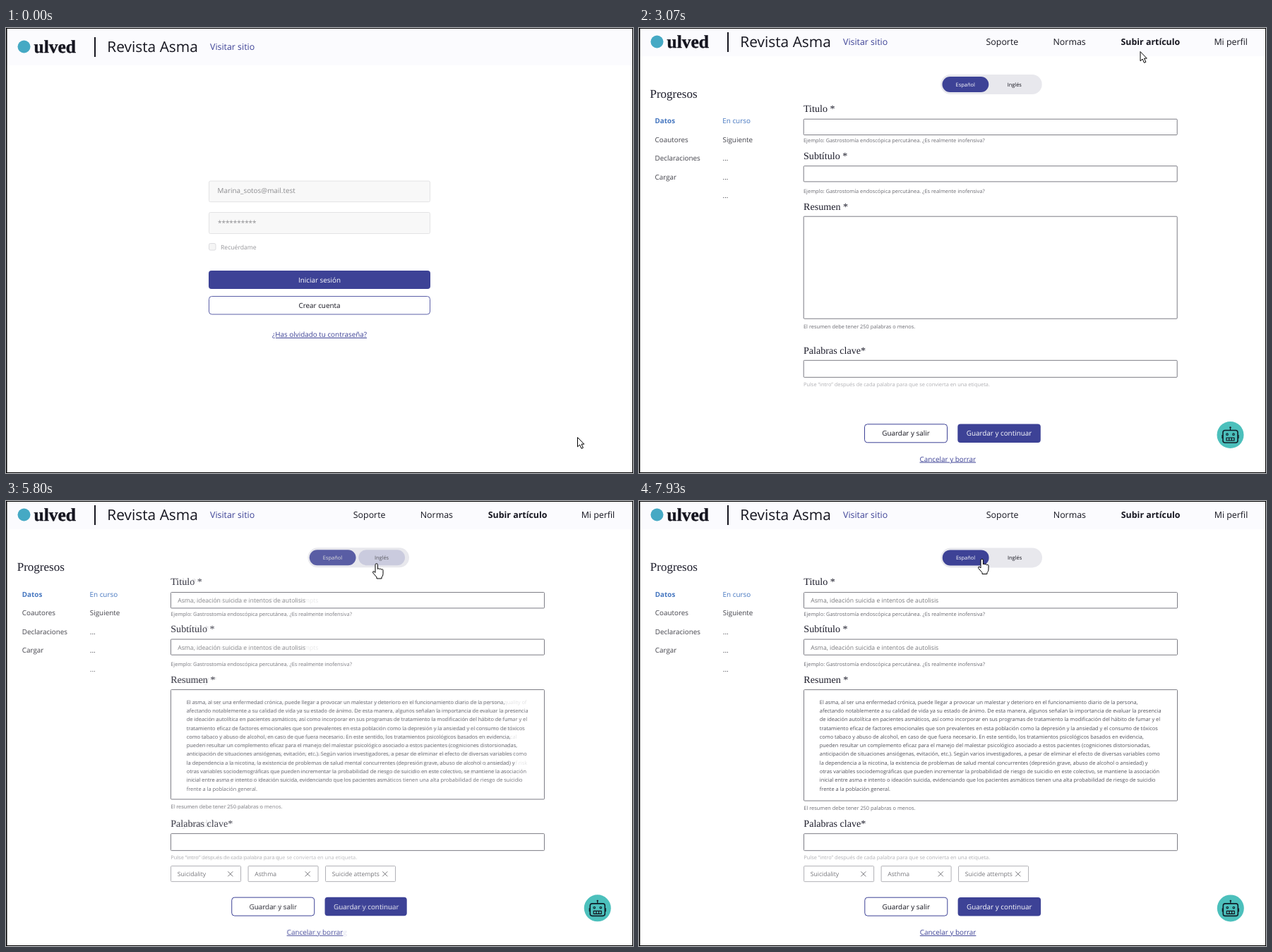
An HTML page for the animation above (8 s loop, 888 by 631 pixels).

```html
<!DOCTYPE html>
<html lang="es">
<head>
<meta charset="utf-8">
<style>
  html, body { margin: 0; width: 100%; height: 100%; overflow: hidden; background: #fff; }
  svg { display: block; width: 888px; height: 631px; text-rendering: geometricPrecision; font-family: "Open Sans", sans-serif; fill: #15151f; }
  .serif { font-family: "Liberation Serif", serif; }
  .bold { font-weight: 700; }
  .mid { text-anchor: middle; }
  .link { text-decoration: underline; }
</style>
</head>
<body>
<svg id="stage" viewBox="0 0 888 631"></svg>
<script>
const BLUE = '#3d4296', SKY = '#4677c0', INK = '#15151f', SOFT = '#6b6b72', WHITE = '#fff';

const text = (x, y, str, size = 9.9, color = INK, cls = '') =>
  `<text x="${x}" y="${y}" font-size="${size}" fill="${color}" class="${cls}">${str}</text>`;
const rect = (x, y, w, h, fill = 'none', stroke = 'none', r = 0, extra = '') =>
  `<rect x="${x}" y="${y}" width="${w}" height="${h}" rx="${r}" fill="${fill}" stroke="${stroke}" ${extra}/>`;
const path = (d, width = 1, color = INK, fill = 'none', extra = '') =>
  `<path d="${d}" fill="${fill}" stroke="${color}" stroke-width="${width}" stroke-linejoin="round" ${extra}/>`;
const group = (id, content, extra = '') => `<g id="${id}" ${extra}>${content}</g>`;
const serif = (x, y, str, size = 14.1, cls = '') => text(x, y, str, size, '#1d1d2b', 'serif ' + cls);

const nav = (y, items) => items.map(([x, str, cls]) => text(x, y, str, 12.4, INK, cls)).join('');

const robot = (x, y) => `<g transform="translate(${x} ${y})">
  <circle r="19" fill="#4cc0bc"/>
  ${rect(-10.5, -6.5, 21, 17.5, 'none', '#10202a', 3, 'stroke-width="1.6"')}
  ${path('M0-6.5V-9.5M-11.5 0V5M11.5 0V5M-5.5 4H5.5V8H-5.5ZM-1.8 4V8M1.8 4V8', 1.2)}
  <circle cy="-10.5" r="1.2"/>
  <circle cx="-4.5" cy="-.8" r="1.3" fill="none" stroke="#10202a" stroke-width="1.1"/>
  <circle cx="4.5" cy="-.8" r="1.3" fill="none" stroke="#10202a" stroke-width="1.1"/></g>`;

const login = [
  rect(287.5, 217, 313, 29.5, '#f8f8f8', '#e3e3e5', 2),
  rect(287.5, 261.5, 313, 30, '#f8f8f8', '#e3e3e5', 2),
  text(299.5, 234, 'Marina_sotos@mail.test', 9.9, '#8c8c8f'),
  text(300, 279.5, '**********', 9.9, '#8c8c8f'),
  rect(287.5, 305.5, 9.5, 9.5, '#f5f5f5', '#dcdcdf', 2),
  text(304, 313.5, 'Recuérdame', 8.65, '#96969a'),
  rect(287, 344, 314, 26, BLUE, 'none', 4),
  text(444, 360.5, 'Iniciar sesión', 9.9, WHITE, 'mid'),
  rect(287.5, 380.5, 313, 25.5, WHITE, '#5c60a8', 4),
  text(444, 397, 'Crear cuenta', 9.9, INK, 'mid'),
  text(444, 438, '¿Has olvidado tu contraseña?', 9.9, BLUE, 'mid link')
].join('');

const card = (x, w, label, labelWidth, color, dotsX) => [
  rect(x + .5, 295.5, w, 138, '#fbfbfe', '#74747f', 4),
  rect(x + 19, 317, labelWidth, 15, color, 'none', 2),
  text(x + 19 + labelWidth / 2, 327.3, label, 7.4, WHITE, 'mid'),
  ...[319.5, 324, 328.5].map(y => `<circle cx="${dotsX}" cy="${y}" r="1.4"/>`),
  text(x + 18.5, 353.5, 'RCNP-2024-15-R1', 9.9, BLUE, 'bold'),
  text(x + 19, 378, 'Marina Sotos', 8.65, '#55555c'),
  serif(x + 19, 398, 'Asma, ideación suicida e intentos', 12.1),
  serif(x + 19, 412.5, 'de autolisis', 12.1)
].join('');

const counter = (numX, x, count, label) =>
  serif(numX, 219, count, 26.5) + text(x, 240, label, 9.9, SOFT);

const dash = [
  nav(31.3, [[494, 'Soporte'], [589, 'Normas'], [684.5, 'Subir artículo'], [810.5, 'Mi perfil', 'bold']]),
  path('M430 122V94Q430 92.5 431.5 92.5H451L457.5 99V103M457.5 114V122M451 93V99H457M435 101H446M435 107H450M435 113H446', 2),
  path('M447 119L448.5 113.5 459.5 101.5Q461.5 100.5 463.5 103.5L452 116.5Z', 2),
  rect(231, 121, 426.5, 60.5, '#e7e7ea', 'none', 4),
  serif(444, 160, 'Hola, Marina Sotos Peñalbar', 14.1, 'mid'),
  counter(232, 230.5, 3, 'enviados'), counter(321.5, 322.5, 1, 'con cambios'),
  counter(413.5, 414, 1, 'revisión'), counter(508.5, 506, 0, 'completados'),
  counter(597.5, 597.5, 1, 'rechazados'),
  rect(230.5, 248, 60, 3, BLUE),
  card(122, 203, 'Revisión', 39, '#4d77c6', 296.5),
  card(339, 209.5, 'Rechazado', 48, '#e03636', 522.5),
  card(562.5, 203.5, 'Cambios', 40, '#e67d35', 739),
  robot(836, 584.5)
].join('');

const field = (y, h, extra = '') => rect(233.2, y, 529, h, WHITE, '#7c7c84', 1, extra);
const chip = (x, str, cross) =>
  rect(x + .3, 517.3, 99, 22, WHITE, '#b0b0b5', 1) + text(x + 9.5, 532, str, 8.65, '#75757a') +
  path(`M${cross - 3.5} 525l7 7m0-7l-7 7`, 1, '#77777c');

const form = [
  nav(24, [[491.5, 'Soporte'], [586.5, 'Normas'], [682.5, 'Subir artículo', 'bold'], [814.4, 'Mi perfil']]),
  serif(15.5, 99, 'Progresos', 17),
  text(22.5, 135.3, 'Datos', 9.9, SKY, 'bold'), text(118.3, 135.3, 'En curso', 9.9, SKY),
  ...['Coautores', 'Declaraciones', 'Cargar'].map((s, i) => text(22.5, 161.8 + i * 26.5, s, 9.9, '#44444c')),
  ...['Siguiente', '...', '...'].map((s, i) => text(118.5, 161.8 + i * 26.5, s, 9.9, '#44444c')),
  rect(427.2, 66, 143.5, 28, '#e8e8ed', 'none', 14),
  field(129.2, 22.4), field(195.7, 22.2), field(267.2, 145, 'id="summaryBox"'), field(471.3, 24),
  rect(319.5, 561.8, 117, 26, WHITE, BLUE, 4),
  rect(451.3, 561.5, 117.5, 26.5, BLUE, 'none', 4, 'id="saveButton"'),
  robot(837.5, 577)
].join('');

const language = ({ titles, example, limit, tip, tipColor, save, leave, saveX, leaveX, pillX, spanish, english }) => [
  rect(pillX, 69, 65.8, 22, BLUE, 'none', 11),
  text(462.2, 82.7, 'Español', 7.4, spanish, 'mid'), text(531.8, 82.7, 'Inglés', 7.4, english, 'mid'),
  ...titles.map((s, i) => serif(233, [119, 186, 257.5, 461.5][i], s)),
  text(233, 162.3, example, 7.4, SOFT), text(233, 233.7, example, 7.4, SOFT),
  `<g class="limit">${text(233, 425.5, limit, 7.4, SOFT)}</g>`,
  text(233, 507.5, tip, 7.4, tipColor),
  text(378, 578.3, save[0], 9.9, INK, 'mid'), text(saveX, 578.3, save[1], 9.9, WHITE, 'mid'),
  text(leaveX, 614.5, leave, 9.9, BLUE, 'mid link')
].join('');

const answers = (title, lines) =>
  text(243, 143.7, title, 8.65, '#77777b') + text(243, 210.3, title, 8.65, '#77777b') +
  lines.map((s, i) => text(255.5, 287.3 + i * 12.3, s, 7.4, '#50505a')).join('');

const spanish = language({
  titles: ['Titulo *', 'Subtítulo *', 'Resumen *', 'Palabras clave*'],
  example: 'Ejemplo: Gastrostomía endoscópica percutánea. ¿Es realmente inofensiva?',
  limit: 'El resumen debe tener 250 palabras o menos.',
  tip: 'Pulse “intro” después de cada palabra para que se convierta en una etiqueta.', tipColor: '#b0b0b4',
  save: ['Guardar y salir', 'Guardar y continuar'], leave: 'Cancelar y borrar',
  saveX: 510, leaveX: 437.3, pillX: 429.5, spanish: WHITE, english: INK
}) + text(118.5, 241.3, '...', 9.9, '#44444c');

const english = language({
  titles: ['Title *', 'Subtitle *', 'Summary *', 'Keywords*'],
  example: 'Example: Percutaneous endoscopic gastrostomy. Is it really harmless?',
  limit: 'The abstract must be 250 words or less.',
  tip: 'Press “enter” after each word to make it a tag.', tipColor: SOFT,
  save: ['Save and exit', 'Save and continue'], leave: 'Exit without saving',
  saveX: 506, leaveX: 439.5, pillX: 499, spanish: INK, english: WHITE
}) + answers('Asthma, suicidal ideation, and self-harm attempts', [
  'Asthma, being a chronic disease, can cause discomfort and deterioration in a person’s daily functioning, significantly affecting their quality of',
  'life and mood. In this way, some point out the importance of evaluating the presence of self-harm ideation in asthmatic patients, as well as',
  'incorporating in their treatment programs the modification of smoking habits and the effective treatment of emotional factors that are',
  'prevalent in this population such as depression and anxiety and the consumption of toxic substances such as tobacco and alcohol abuse, if',
  'necessary. In this sense, evidence-based psychological treatments can be an effective complement for the management of psychological',
  'discomfort associated with these patients (distorted cognitions, anticipation of anxiety-inducing situations, avoidance, etc.). According to',
  'several researchers, despite eliminating the effect of various variables such as nicotine dependence, the existence of concurrent mental',
  'health problems (severe depression, alcohol abuse or anxiety) and other sociodemographic variables that can increase the probability of risk',
  'of suicide in this group, the initial association between asthma and suicidal ideation or attempt is maintained, showing that asthmatic',
  'patients have a high probability of suicide risk compared to the general population.'
]);

const spanishAnswers = answers('Asma, ideación suicida e intentos de autolisis', [
  'El asma, al ser una enfermedad crónica, puede llegar a provocar un malestar y deterioro en el funcionamiento diario de la persona,',
  'afectando notablemente a su calidad de vida ya su estado de ánimo. De esta manera, algunos señalan la importancia de evaluar la presencia',
  'de ideación autolítica en pacientes asmáticos, así como incorporar en sus programas de tratamiento la modificación del hábito de fumar y el',
  'tratamiento eficaz de factores emocionales que son prevalentes en esta población como la depresión y la ansiedad y el consumo de tóxicos',
  'como tabaco y abuso de alcohol, en caso de que fuera necesario. En este sentido, los tratamientos psicológicos basados en evidencia,',
  'pueden resultar un complemento eficaz para el manejo del malestar psicológico asociado a estos pacientes (cogniciones distorsionadas,',
  'anticipación de situaciones ansiógenas, evitación, etc.). Según varios investigadores, a pesar de eliminar el efecto de diversas variables como',
  'la dependencia a la nicotina, la existencia de problemas de salud mental concurrentes (depresión grave, abuso de alcohol o ansiedad) y',
  'otras variables sociodemográficas que pueden incrementar la probabilidad de riesgo de suicidio en este colectivo, se mantiene la asociación',
  'inicial entre asma e intento o ideación suicida, evidenciando que los pacientes asmáticos tienen una alta probabilidad de riesgo de suicidio',
  'frente a la población general.'
]);

const brand = `<circle cx="25.5" cy="26.5" r="9" fill="#45a9c4"/>` +
  `<text x="39.5" y="35" font-size="25.5" class="serif bold" stroke="${INK}" stroke-width=".4">ulved</text>`;
const title = rect(125, 13, 2, 28, INK) + text(143.3, 34, 'Revista Asma', 20.9) +
  text(289, 31, 'Visitar sitio', 12.4, BLUE);

const stage = document.getElementById('stage');
stage.innerHTML = [
  rect(0, 0, 888, 631, WHITE),
  rect(0, 0, 888, 53, '#fbfbfe', 'none', 0, 'id="bar"'),
  group('header', brand + group('title', title)),
  group('login', login), group('dash', dash),
  group('form', form +
    group('chips', chip(233, 'Suicidality', 317.5) + chip(342.5, 'Asthma', 427) + chip(452, 'Suicide attempts', 536.5)) +
    group('spanish', spanish) + group('answers', spanishAnswers) + group('english', english)),
  path('M0 0H888V1H1.5V630H887V1H888V631H0Z', 0, 'none', '#000'),
  group('arrow', path('M.5 .5V13.8L3.6 11 6 16.3 8.4 15.2 6 10.1H9.8Z', 1, '#000', WHITE)),
  group('hand', path('M4 13V2a1.7 1.7 0 0 1 3.4 0V8a1.4 1.4 0 0 1 2.6.3 1.4 1.4 0 0 1 2.6.6 1.3 1.3 0 0 1 2.4.8V15q0 3-2 4.5V21.5H6V19.5L.8 13.5Q0 11 2 11.2Z', 1, '#000', WHITE))
].join('');

const el = id => document.getElementById(id);
const limits = document.querySelectorAll('.limit');
const clamp = v => Math.min(1, Math.max(0, v));
const fade = (t, start, length = 500) => 1 - (1 - clamp((t - start) / length)) ** 1.7;
const glide = (t, start, end) => { const p = clamp((t - start) / (end - start)); return p * p * (3 - 2 * p); };
const opacity = (id, value) => el(id).setAttribute('opacity', value);
const show = (id, on) => el(id).setAttribute('display', on ? 'inline' : 'none');
const move = (node, x, y) => node.setAttribute('transform', `translate(${x} ${y})`);

// start, end, x and y of each stop of the arrow
const stops = [[20, 800, 568, 367], [1880, 2730, 709.5, 33], [3750, 4600, 521, 97]];

function draw(t) {
  const onForm = t >= 3000;
  const enter = fade(t, 1010);
  const filled = fade(t, 3740);
  const toEnglish = fade(t, 5750) - fade(t, 7540, 400);
  const inSpanish = filled * (1 - toEnglish);

  show('login', !onForm); opacity('login', 1 - enter);
  show('dash', !onForm); opacity('dash', enter);
  show('form', onForm);
  move(el('header'), 0, onForm ? -7 : 0);
  el('bar').setAttribute('height', onForm ? 40 : 53);
  opacity('title', 1 - enter * (1 - enter));

  opacity('chips', filled);
  opacity('answers', inSpanish);
  opacity('spanish', 1 - toEnglish);
  opacity('english', toEnglish);
  const grow = 12.5 * inSpanish;
  el('summaryBox').setAttribute('height', 145 + grow);
  el('saveButton').setAttribute('width', 117.5 - 8 * toEnglish);
  limits.forEach(node => move(node, 0, grow));
  move(el('form'), .3 * inSpanish, .4 * inSpanish);

  let x = 809, y = 580;
  for (const [start, end, toX, toY] of stops) {
    const p = glide(t, start, end);
    x += (toX - x) * p;
    y += (toY - y) * p;
  }
  move(el('arrow'), x, y);
  show('arrow', t < 4670);
  const back = glide(t, 6940, 7200);
  move(el('hand'), 519 - 39 * back, 88.5 - 6.5 * back);
  show('hand', t >= 4670);
}

const begin = performance.now();
function tick() {
  draw((performance.now() - begin) % 8000);
  requestAnimationFrame(tick);
}
tick();
</script>
</body>
</html>
```
